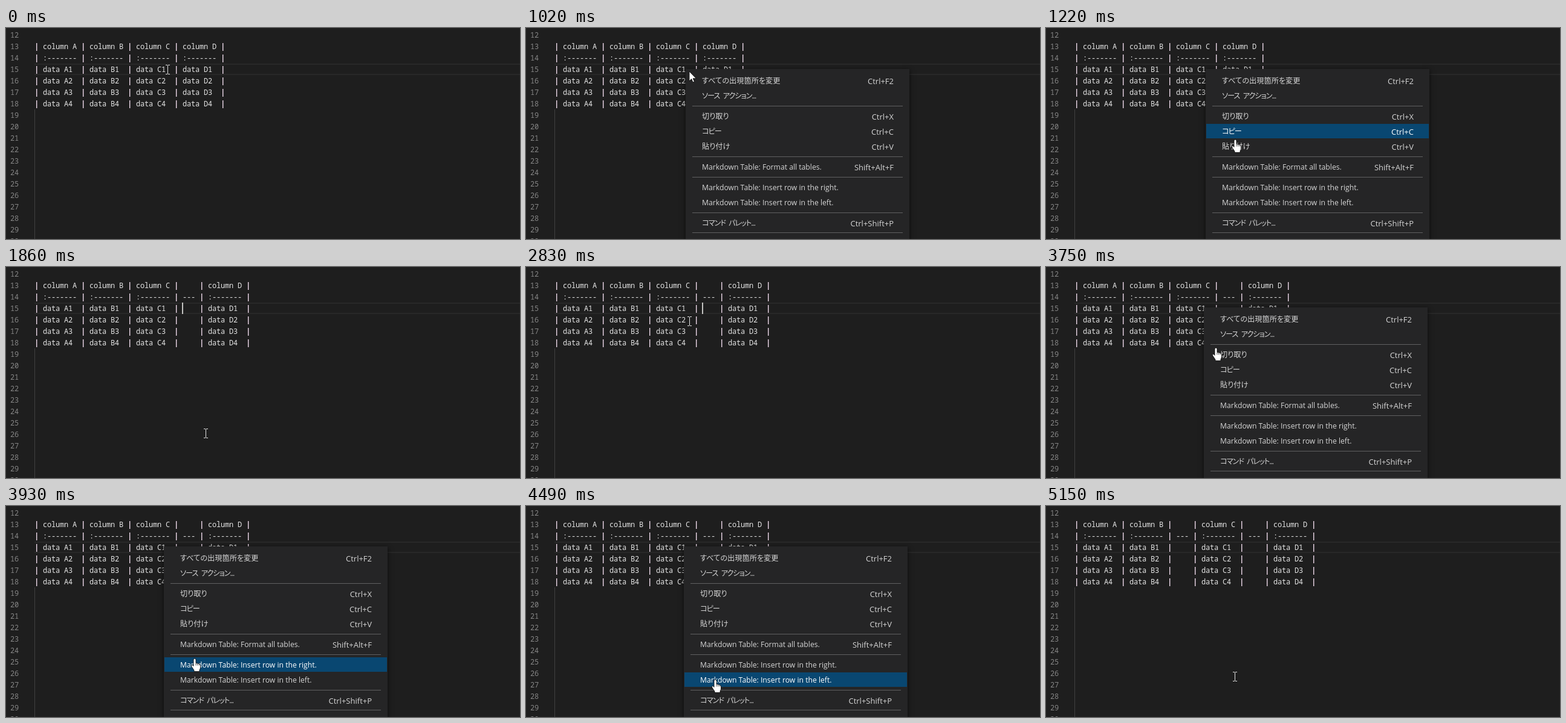
Write an HTML page with a canvas that moves like this. It is 850 px wide and 350 px high and loops after 5610 ms.

```html
<!DOCTYPE html>
<html lang="ja">
<head>
<meta charset="utf-8">
<style>
html, body { margin: 0; width: 100%; height: 100%; overflow: hidden; background: #1e1e1e; }
canvas, #menu, #pointer { position: absolute; left: 0; top: 0; }
#menu {
  width: 370px; height: 420px; background: #252526; color: #d6d6d6;
  box-shadow: 0 2px 8px rgba(0, 0, 0, .65);
  font: 500 12.2px/26px "Open Sans", "Noto Sans CJK JP", "Noto Sans CJK", sans-serif;
  white-space: nowrap;
}
.item { position: absolute; left: 1px; width: 368px; height: 24px; }
.item.on { background: #094771; color: #fff; }
.item span { position: absolute; left: 26px; }
.item b { position: absolute; right: 25px; font-weight: 500; font-size: 13px; }
.ja { font-feature-settings: "palt"; }
.kana { letter-spacing: -1px; word-spacing: 3px; }
.rule { position: absolute; left: 11px; width: 348px; height: 1px; background: #606061; }
#pointer { width: 40px; height: 44px; }
</style>
</head>
<body>
<canvas id="editor" width="850" height="350"></canvas>
<div id="menu"></div>
<svg id="pointer" viewBox="-20 -20 40 44">
  <path id="beam" d="M-3-7.5H0M1-7.5H4M.5-7V7M-3 7.5H0M1 7.5H4" fill="none" stroke="#e4e4e4"/>
  <path id="arrow" d="M0 0V16L3.7 12.5L6 18L8.5 17L6.2 11.7H11.3Z" fill="#fff" stroke="#000" stroke-width=".8"/>
  <g id="hand" transform="translate(0 1)">
    <path d="M-2 2Q-2 0 0 0T2 2V7.5L4.5 8Q5 8 7 8.6Q9.5 9.4 9.5 12V15Q9.5 17 8 19V21.5H-1V19.5L-5 13.5Q-6.3 11.2-5 10.6Q-3.6 10.2-2 12.5Z" fill="#fff" stroke="#000" stroke-width=".8"/>
    <path d="M2 8V11.5M4.6 8.5V11.5M7.1 9V11.5" stroke="#222" stroke-width=".8"/>
  </g>
</svg>
<script>
const LOOP = 5610, STEP = 50, PHASE = 20;
const LEFT = 47, CHAR = 7, ROW = 19, FIRST = 12;
const $ = id => document.getElementById(id);
const ctx = $('editor').getContext('2d');
const menu = $('menu'), pointer = $('pointer');

// label, shortcut, centre within the menu, text class
const ITEMS = [
  ['すべての出現箇所を変更', 'Ctrl+F2', 20, 'ja'],
  ['ソース アクション...', '', 45, 'ja kana'],
  ['切り取り', 'Ctrl+X', 79, 'ja'],
  ['コピー', 'Ctrl+C', 104, 'ja kana'],
  ['貼り付け', 'Ctrl+V', 129, 'ja'],
  ['Markdown Table: Format all tables.', 'Shift+Alt+F', 163, ''],
  ['Markdown Table: Insert row in the right.', '', 197, ''],
  ['Markdown Table: Insert row in the left.', '', 222, ''],
  ['コマンド パレット...', 'Ctrl+Shift+P', 256, 'ja kana']
];
const RULES = [61, 145, 179, 238, 271];

// time, x, y, pointer shape
const PATH = [
  [0, 267, 69, 'beam'], [620, 267, 69, 'beam'],
  [670, 265, 68, 'arrow'], [970, 265, 68, 'arrow'], [1020, 270, 72, 'arrow'],
  [1070, 278, 92, 'hand'], [1220, 313, 184, 'hand'], [1420, 330, 276, 'hand'],
  [1770, 330, 276, 'beam'], [2270, 330, 276, 'beam'],
  [2600, 298, 160, 'beam'], [2870, 264, 74, 'beam'], [2920, 264, 70, 'beam'], [2960, 264, 67, 'beam'],
  [3220, 264, 67, 'beam'], [3270, 264, 66, 'hand'], [3570, 264, 66, 'hand'], [3620, 266, 74, 'hand'],
  [3920, 312, 252, 'hand'], [4170, 312, 274, 'hand'], [4220, 312, 274, 'hand'],
  [4370, 313, 287, 'hand'], [4520, 313, 287, 'beam'],
  [4770, 313, 287, 'beam'], [5120, 312, 283, 'beam'], [LOOP, 312, 283, 'beam']
];

const MENUS = [
  { from: 670, to: 1770, x: 264, y: 68 },
  { from: 3270, to: 4520, x: 261, y: 67 }
];
const CARETS = [[1820, 2320, 35], [2820, 3270, 35], [4620, 5120, 24]];

function add(parent, tag, cls, text = '') {
  const el = document.createElement(tag);
  el.className = cls;
  el.textContent = text;
  return parent.appendChild(el);
}

const rows = ITEMS.map(([label, keys, y, cls]) => {
  const el = add(menu, 'div', 'item');
  el.style.top = y - 13 + 'px';
  add(el, 'span', cls, label);
  add(el, 'b', '', keys);
  return el;
});
RULES.forEach(y => { add(menu, 'div', 'rule').style.top = y + 'px'; });

const rowY = n => 12 + (n - FIRST) * ROW;

function tableLines(cols) {
  const line = f => '| ' + cols.map(f).join(' | ') + ' |';
  const lines = [
    line(c => c === ' ' ? '   ' : 'column ' + c),
    line(c => c === ' ' ? '---' : ':-------')
  ];
  for (let i = 1; i <= 4; i++) lines.push(line(c => c === ' ' ? '   ' : `data ${c}${i} `));
  return lines;
}

function drawText(text, x, y, color) {
  [...text].forEach((ch, i) => {
    const cx = x + i * CHAR;
    if (ch === '|') {
      ctx.fillStyle = '#ecd8e8';
      ctx.fillRect(cx + 3, y - 6, 1.4, 13);
    } else if (ch !== ' ') {
      ctx.fillStyle = color;
      ctx.fillText(ch, cx + CHAR / 2, y + 4);
    }
  });
}

function drawEditor(t) {
  ctx.fillStyle = '#1e1e1e';
  ctx.fillRect(0, 0, 850, 350);
  ctx.fillStyle = '#282828';
  ctx.fillRect(LEFT, 59, 850, 2);
  ctx.fillRect(LEFT, 76, 850, 2);
  ctx.fillStyle = '#404040';
  ctx.fillRect(LEFT, 135, 1, 215);

  ctx.font = '500 12px "Noto Sans Mono", monospace';
  ctx.textAlign = 'center';
  for (let n = FIRST; n <= 30; n++) drawText(String(n), 7, rowY(n), '#858585');
  const cols = t < 1820 ? 'ABCD' : t < 4620 ? 'ABC D' : 'AB C D';
  tableLines([...cols]).forEach((s, i) => drawText(s, LEFT, rowY(13 + i), '#e4e4e4'));

  const caret = CARETS.find(([from, to]) => t >= from && t < to);
  if (caret) {
    ctx.fillStyle = '#c4c4c2';
    ctx.fillRect(LEFT + caret[2] * CHAR - 1, 59, 2, ROW);
  }
}

function pointerAt(t) {
  const i = PATH.findIndex(k => k[0] > t);
  const [t0, x0, y0, shape] = PATH[i - 1], [t1, x1, y1] = PATH[i];
  const k = (t - t0) / (t1 - t0);
  return { x: Math.round(x0 + (x1 - x0) * k), y: Math.round(y0 + (y1 - y0) * k), shape };
}

function drawMenu(t, p) {
  const m = MENUS.find(m => t >= m.from && t < m.to);
  menu.style.display = m ? 'block' : 'none';
  if (!m) return;
  menu.style.transform = `translate(${m.x}px,${m.y}px)`;
  ITEMS.forEach(([, , c], i) => {
    const d = p.y - m.y - c;
    rows[i].classList.toggle('on', d >= -12 && d < 13);
  });
}

function drawPointer(p) {
  pointer.style.transform = `translate(${p.x - 20}px,${p.y - 20}px)`;
  for (const s of ['beam', 'arrow', 'hand']) $(s).style.display = s === p.shape ? '' : 'none';
}

const start = performance.now();
function frame() {
  const now = (performance.now() - start) % LOOP;
  // the screen was sampled at a coarse rate
  const t = Math.max(0, Math.floor((now - PHASE) / STEP) * STEP + PHASE);
  const p = pointerAt(t);
  drawEditor(t);
  drawMenu(t, p);
  drawPointer(p);
  requestAnimationFrame(frame);
}
frame();
</script>
</body>
</html>
```
